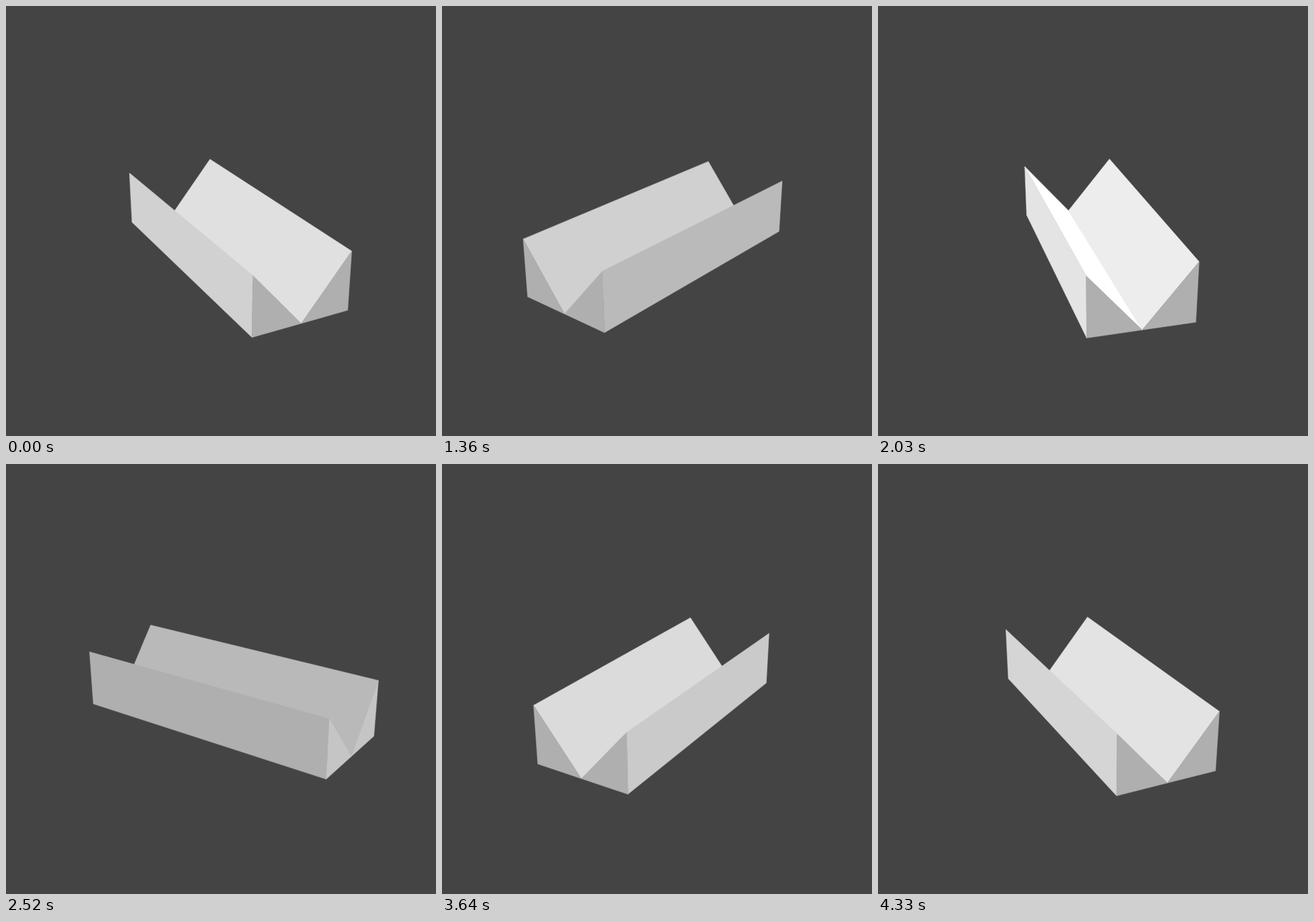
An HTML page with a canvas for the animation above (4.36 s loop, 600 by 600 pixels).

```html
<!DOCTYPE html>
<html>
<head>
<meta charset="utf-8">
<style>
html, body { margin: 0; height: 100%; overflow: hidden; background: #444; }
canvas { display: block; }
</style>
</head>
<body>
<canvas id="stage" width="600" height="600"></canvas>
<script>
const ctx = document.getElementById('stage').getContext('2d');
const LOOP = 4360, RAD = Math.PI / 180;

// Block: half length, half width, height
const A = 190, B = 68, H = 81.3;

// Camera: focal length, pitch, screen centre, lift of the block's base
const F = 1120, SIN = .398, COS = .917, CX = 309.5, CY = 300, LIFT = -56.3;
const EYE = [0, F * SIN - LIFT * COS, F * COS + LIFT * SIN];

// Two lights behind the block, left and right
const AMBIENT = .43, POWER = .49;
const LIGHTS = [[1, .5, -1], [-1, .5, -1]];

const dot = (p, q) => p[0] * q[0] + p[1] * q[1] + p[2] * q[2];

function project([x, y, z]) {
  const k = F / (F - y * SIN - z * COS);
  return [CX + x * k, CY - (y * COS - z * SIN + LIFT) * k];
}

function shade(n) {
  let v = AMBIENT;
  for (const l of LIGHTS) v += POWER * Math.max(0, dot(n, l));
  const c = Math.round(255 * (1.055 * Math.min(1, v) ** (1 / 2.4) - .055));
  return `rgb(${c},${c},${c})`;
}

function drawFace(points, n) {
  const view = EYE.map((v, i) => v - points[0][i]);
  if (dot(n, view) <= 0) return;
  ctx.beginPath();
  for (const p of points) ctx.lineTo(...project(p));
  ctx.closePath();
  ctx.fillStyle = ctx.strokeStyle = shade(n);
  ctx.fill();
  ctx.stroke();
}

function draw(time) {
  const angle = (-27.65 - 360 * (time % LOOP) / LOOP) * RAD;
  const s = Math.sin(angle), c = Math.cos(angle);
  // Local axes: along the block, up, across the block
  const turn = (along, y, across) =>
    [along * s + across * c, y, -along * c + across * s];
  const slope = Math.hypot(B, H);

  ctx.fillStyle = '#444';
  ctx.fillRect(0, 0, 600, 600);
  ctx.lineWidth = .5;
  ctx.lineJoin = 'round';

  const near = s > 0 ? 1 : -1;
  for (const side of [-near, near]) {
    const section = end => [
      turn(end * A, 0, 0),
      turn(end * A, 0, side * B),
      turn(end * A, H, side * B)
    ];
    const p = section(1), q = section(-1);
    drawFace([p[0], p[2], q[2], q[0]], turn(0, B / slope, -side * H / slope));
    drawFace([p[1], p[2], q[2], q[1]], turn(0, 0, side));
    drawFace(p, turn(1, 0, 0));
    drawFace(q, turn(-1, 0, 0));
  }
}

const start = performance.now();
function tick() {
  draw(performance.now() - start);
  requestAnimationFrame(tick);
}
tick();
</script>
</body>
</html>
```
